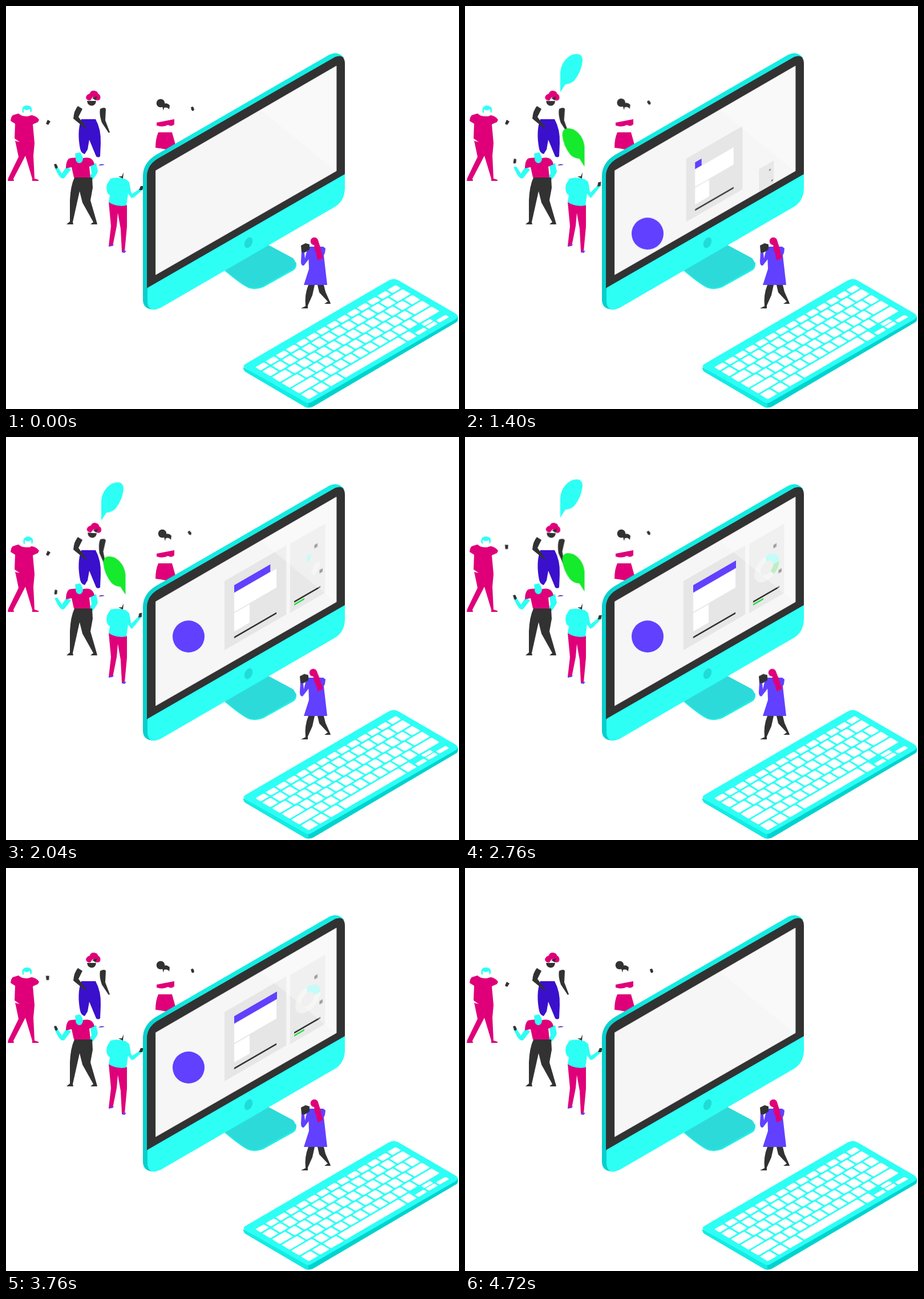
Recreate the animation shown at these times as an HTML page. Size 794 by 705 pixels, loop 4.84 s.

```html
<!DOCTYPE html>
<html lang="en">
<head>
<meta charset="utf-8">
<title>People around a screen</title>
<style>
  html, body { margin: 0; width: 100%; height: 100%; overflow: hidden; background: #fff; }
  svg { display: block; width: 100%; height: 100%; }
  .cyan { fill: #2dfff5; }
  .pink { fill: #df0079; }
  .dark { fill: #323232; }
  .blue { fill: #3a10cc; }
  .violet { fill: #6140ff; }
  .white { fill: #fff; }

  .move { animation: 4840ms linear infinite both; }

  /* Small gestures: each goes to its pose --p and returns. */
  .nod { animation-name: nod; }
  .lift { animation-name: lift; }
  .sway { animation-name: sway; }
  .wave { animation-name: wave; }
  .reach { animation-name: reach; }
  .turn { animation-name: turn; }
  .nod, .lift, .sway, .wave, .reach, .turn { animation-timing-function: ease-in-out; }
  @keyframes nod { 0%, 3%, 56%, 100% { transform: none; } 14%, 43% { transform: var(--p); } }
  @keyframes lift { 0%, 42%, 97.5%, 100% { transform: none; } 54%, 80% { transform: var(--p); } }
  @keyframes sway { 0%, 26%, 79%, 100% { transform: none; } 40%, 61% { transform: var(--p); } }
  @keyframes wave { 0%, 18%, 77%, 100% { transform: none; } 32%, 61% { transform: var(--p); } }
  @keyframes reach { 0%, 6%, 70%, 100% { transform: none; } 27%, 43% { transform: var(--p); } }
  @keyframes turn { 0%, 30%, 76%, 100% { transform: none; } 41%, 60% { transform: var(--p); } }

  .bubble { transform-origin: 167px 151px; }
  .first { animation-name: first; }
  .second { animation-name: second; }
  @keyframes first {
    0%, 7.4% { opacity: 0; transform: translateY(14px) scale(.1); animation-timing-function: ease-out; }
    11.6% { opacity: 1; transform: translateY(6px); }
    58.7% { opacity: 1; transform: translateY(-10.5px); animation-timing-function: ease-in; }
    71.5%, 100% { opacity: 0; transform: translateY(-51px); }
  }
  @keyframes second {
    0%, 15.7% { opacity: 0; transform: translateY(14px) scale(.1); animation-timing-function: ease-in-out; }
    21% { opacity: 1; transform: translateY(4px); }
    58.7% { opacity: 1; transform: translateY(-10.5px); animation-timing-function: ease-in; }
    71.5%, 100% { opacity: 0; transform: translateY(-51px); }
  }

  .rise { animation-name: rise; --dy: 140px; --s: 0; }
  .page { transform-origin: 437px 281px; }
  .stats { transform-origin: 528px 230px; --dy: 127px; animation-delay: 170ms; }
  .badge { --dy: 150px; --s: 1; animation-delay: 110ms; }
  @keyframes rise {
    0%, 23.1% { transform: translateY(var(--dy)) scale(var(--s)); animation-timing-function: ease; }
    32.2% { transform: none; }
    78% { transform: none; animation-timing-function: ease-in; }
    88%, 100% { transform: translateY(var(--dy)) scale(var(--s)); }
  }

  .bar { animation-name: bar; transform-origin: 17px 0; }
  @keyframes bar {
    0%, 26.5% { transform: scaleX(0); animation-timing-function: ease-out; }
    50%, 100% { transform: none; }
  }

  .ring { fill: none; stroke-width: 10.5; animation-name: ring; }
  @keyframes ring {
    0%, 39.5% { stroke-dasharray: 0 360; }
    40% { stroke-dasharray: 1 360; animation-timing-function: ease-out; }
    55%, 100% { stroke-dasharray: var(--len) 360; }
  }
  .slice { fill: none; stroke-width: 10.5; animation-name: slice; }
  @keyframes slice {
    0%, 47% { opacity: 0; }
    55%, 72% { opacity: 1; }
    77%, 100% { opacity: 0; }
  }
</style>
</head>
<body>
<svg viewBox="0 0 794 705" xmlns="http://www.w3.org/2000/svg">
  <defs>
    <linearGradient id="edge" x1="240" x2="330" y1="0" y2="0" gradientUnits="userSpaceOnUse">
      <stop offset="0" stop-color="#06cfcc"/>
      <stop offset="1" stop-color="#14ece3"/>
    </linearGradient>
    <clipPath id="glass"><path d="M263 288L579 105V288L262 470Z"/></clipPath>
    <path id="drop" d="M167 151V116Q169 96 186 86Q206 79 206 96Q204 115 192 130Q185 137 176 137Z"/>
  </defs>

  <!-- man in pink -->
  <g>
    <path class="pink" d="M22 188Q30 196 45 191Q53 192 58 199L56 203 47 207 50 240 48 262 50 302 57 304V306H46V302L34 262 13 302 14 306H3L4 301 22 264 17 240 15 232 16 206 8 201Q9 193 12 191Z"/>
    <path class="white" d="M14 231L24 238 16 236Z"/>
    <g class="move nod" style="--p: translate(2px, .5px)">
      <path class="white" d="M30 182V188Q33 193 38 193 43 192 43 187V182Z"/>
      <path class="cyan" d="M29 186Q26 175 36 174 47 174 45 184L43 187 42 180Q36 184 31 180L31 187Z"/>
    </g>
    <path class="dark move lift" style="--p: translate(-1px, -11.5px) rotate(-30deg); transform-origin: 74px 203.5px" d="M73 199L78 202 74 208 70 206Z"/>
  </g>

  <!-- woman with curly hair -->
  <g>
    <path class="blue" d="M132 198H157Q167 216 166 240L165 263Q162 266 158 263L146 234 143 251 138 259Q132 258 130 250 124 220 132 198Z"/>
    <path class="blue" d="M162 279Q167 275 173 278Z"/>
    <path class="dark" d="M126 175L134 180 127 194 141 213 140 215 118 197Q119 183 126 175Z"/>
    <path class="dark move sway" style="--p: rotate(10deg); transform-origin: 170px 180px" d="M165 180Q173 176 175 180L174 200 182 221 180 222 168 204Q163 190 165 180Z"/>
    <g class="move sway" style="--p: translate(1px, 2px) rotate(4deg); transform-origin: 152px 168px">
      <path class="dark" d="M142 166H158Q157 174.500 150 174.500 143 174 142 166Z"/>
      <path class="pink" d="M147 153Q148 148 154 148 161 149 161 153 167 156 165 163 161 167 157 164L152 159 148 165Q141 166 140 160 141 155 147 153Z"/>
      <path class="dark" d="M151 161L160 158 157 165Z"/>
    </g>
  </g>

  <!-- woman behind the screen -->
  <g>
    <path class="pink" d="M264 204L295 198V207Q290 212 284 208 274 213 264 209Z"/>
    <path class="pink" d="M267 221H291L298 246 281 251Q272 249 262 248 262 232 267 221Z"/>
    <g class="dark move wave" style="--p: translate(3px, -1px)">
      <circle cx="271" cy="170" r="7.300"/>
      <path d="M273 173Q281 167 287 174L286 181Q283 176 277 178L276 183Z"/>
    </g>
    <path class="dark move wave" style="--p: translate(-5px, -12px) rotate(-15deg); transform-origin: 327px 180px" d="M324 177L328 176 330 181 328 184 325 182Z"/>
  </g>

  <!-- cyan bubble -->
  <use href="#drop" class="cyan move bubble first"/>

  <!-- woman with cyan skin -->
  <g>
    <path class="cyan" d="M106 281L114 286 102 301Q97 304 91 294L85 282 90 281 98 293Z"/>
    <path class="cyan" d="M148 279L158 275 161 290Q157 300 141 315L138 314 150 293Z"/>
    <path class="pink" d="M110 267Q118 264 135 266 152 262 155 277L146 281 148 300H119L115 282 105 284Q105 272 110 267Z"/>
    <path class="cyan" d="M121 258L130 256 134 263Q137 271 130 275 122 275 122 266Z"/>
    <path class="dark" d="M120 300H151L152 318 148 340 159 378 160 382H148L153 378 134 344 129 324 117 378 118 382H106L112 377 112 340Q113 315 120 300Z"/>
    <path class="dark move nod" style="--p: translate(0, -9px) rotate(30deg); transform-origin: 87px 280px" d="M84 277L88 276 91 282 88 285 86 283Z"/>
  </g>

  <!-- man in cyan -->
  <g>
    <path class="pink" d="M180 343Q195 352 212 348L212 386 208 429 203 429 201 390 196 362 194 385 187 420H180L184 385Z"/>
    <path class="violet" d="M180 419L190 417 186 420 180 421ZM203 429L211 428 208 432 203 431Z"/>
    <path class="cyan" d="M183 302Q195 298 210 303L216 308 219 325 224 332 220 336 214 328 211 349Q194 352 180 343L182 331Q174 327 177 312Z"/>
    <path class="dark" d="M197 298L203 298 206 291 205 302Z"/>
    <g class="move reach" style="--p: translate(1px, -4px) rotate(-11deg); transform-origin: 221px 332px">
      <path class="cyan" d="M219 330L234 320 240 321 224 335Q220 337 218 333Z"/>
      <path class="dark" d="M236 315L241 315 239 322 233 322Z"/>
    </g>
  </g>

  <!-- green bubble -->
  <g transform="matrix(-1 0 0 1 376.500 129)">
    <use href="#drop" class="move bubble second" fill="#15ea2c"/>
  </g>

  <!-- stand -->
  <path fill="#22efe8" d="M383 463Q415 490 427 494 439 497 451 492L503 463Q510 459 509 449L458 419Z"/>
  <path fill="#2cdbd9" d="M383 461Q415 488 427 492 439 495 451 489L502 460Q513 453 503 441L458 417Z"/>

  <!-- monitor -->
  <path fill="url(#edge)" d="M240 515V296Q241 274 262 261L567 85Q581 78 592 90L594 294 262 531Q241 532 240 515Z"/>
  <path class="dark" d="M247 494V296Q248 278 266 267L577 89Q593 83 594 100V296Z"/>
  <path class="cyan" d="M248 493L594 294V320Q593 341 577 351L271 528Q249 538 248 516Z"/>
  <ellipse cx="425" cy="414" rx="6.500" ry="10" transform="rotate(25 425 414)" fill="#20dcd6"/>
  <path fill="#f6f6f6" stroke="#e2e2e2" d="M262.500 288L579 105V288.500L262.500 470Z"/>

  <!-- screen content -->
  <g clip-path="url(#glass)">
    <circle class="violet move rise badge" cx="320" cy="349" r="28"/>
    <g class="move rise page">
      <g transform="translate(383 252) skewY(-30)">
        <rect width="108" height="121" fill="#e6e6e6"/>
        <rect class="white" x="17" y="31" width="74" height="33"/>
        <rect class="white" x="17" y="66" width="27" height="32"/>
        <rect class="dark" x="17" y="107" width="74" height="3"/>
        <rect class="violet move bar" x="17" y="17" width="75" height="13"/>
      </g>
    </g>
    <g class="move rise stats">
      <g transform="translate(498 187) skewY(-30)">
        <rect width="61" height="121" fill="#e8e8e8"/>
        <g fill="#6c6c6c">
          <rect x="42.500" y="26.500" width="5.500" height="6"/>
          <rect x="51.500" y="75.500" width="5.500" height="6"/>
        </g>
        <rect class="dark" x="7" y="104" width="46" height="3"/>
        <rect x="7" y="109" width="18" height="3" fill="#2ee04a"/>
        <g transform="translate(31 60)">
          <circle class="move ring" r="16.500" pathLength="360" stroke="#f1f3f0" style="--len: 265"/>
          <circle class="move slice" r="16.500" pathLength="360" stroke="#98e6a4" stroke-dasharray="55 305"/>
          <circle class="move ring" r="16.500" pathLength="360" stroke="#a4fbf4" transform="rotate(-95)" style="--len: 95"/>
        </g>
      </g>
    </g>
    <path class="white" opacity=".35" d="M447 182L579 290V105Z"/>
  </g>

  <!-- photographer -->
  <g>
    <path class="dark" d="M530 488H541L537 506 529 524V529H517L525 525Q523 505 530 488ZM546 488H557L560 500 568 518 569 521H558L564 517 549 501Z"/>
    <path class="violet" d="M530 421L556 421 560 424 559 432 557 436 560 462 563 488H522L531 460 530 430Z"/>
    <g class="move turn" style="--p: translate(-2px, -.5px)">
      <path class="violet" d="M518 429L523 431 524 442 529 421 535 422 533 440 522 454Q517 455 517 447Z"/>
      <path class="dark" d="M517 419L525 415 532 417V426L524 431H518Z"/>
    </g>
    <g class="pink move turn" style="--p: rotate(-4deg); transform-origin: 550px 440px">
      <circle cx="540.500" cy="411.500" r="6.800"/>
      <path d="M540 417L547 410 551 422 553 431 556 441 546 445 544 434 541 427Z"/>
    </g>
  </g>

  <!-- keyboard -->
  <path fill="#00d3ce" d="M416 632L527 694 792 543V549Q792 552 788 554L538 701Q530 704 524 701L420 640Q416 637 416 632Z"/>
  <path fill="#12ece3" d="M416 632L530 692V703Q526 703 522 700L420 640Q416 637 416 632Z"/>
  <path class="cyan" d="M420 626L671 480Q680 475 688 480L788 538Q795 543 788 548L537 692Q530 697 523 692L420 634Q413 630 420 626Z"/>
  <g id="keys" class="white" transform="matrix(2.46 -1.44 .94 .56 437 632)"></g>
</svg>
<script>
  const keys = document.getElementById('keys');

  function addKey(x, y, w, h) {
    const r = document.createElementNS('http://www.w3.org/2000/svg', 'rect');
    Object.entries({ x, y, width: w, height: h, rx: .8, ry: 2 })
      .forEach(([k, v]) => r.setAttribute(k, v));
    keys.append(r);
  }

  // Each row: width of the first key, count of plain keys, width of the last key.
  const rows = [[1, 12, 1], [1, 12, 1.5], [1.5, 12, 1], [1.75, 11, 1.75], [2.25, 10, 2.25]];
  const gap = 1.2;
  rows.forEach(([head, count, tail], i) => {
    const widths = [head, ...Array(count).fill(1), tail];
    const unit = (100 + gap) / (head + count + tail);
    const y = i ? 18 * i - 5 : 0;
    let x = 0;
    for (const w of widths) {
      addKey(x, y, w * unit - gap, i ? 15 : 10);
      x += w * unit;
    }
  });

  // Bottom row: modifiers, space bar and arrows.
  [[0, 6.7], [7.9, 6.7], [15.8, 9.2], [26.2, 43.2], [70.6, 6.3]].forEach(([x, w]) => addKey(x, 85, w, 15));
  [[78.1, 6.3], [85.6, 6.3], [93.1, 6.9]].forEach(([x, w]) => addKey(x, 93, w, 7));
  addKey(85.6, 85, 6.3, 6.5);
</script>
</body>
</html>
```
